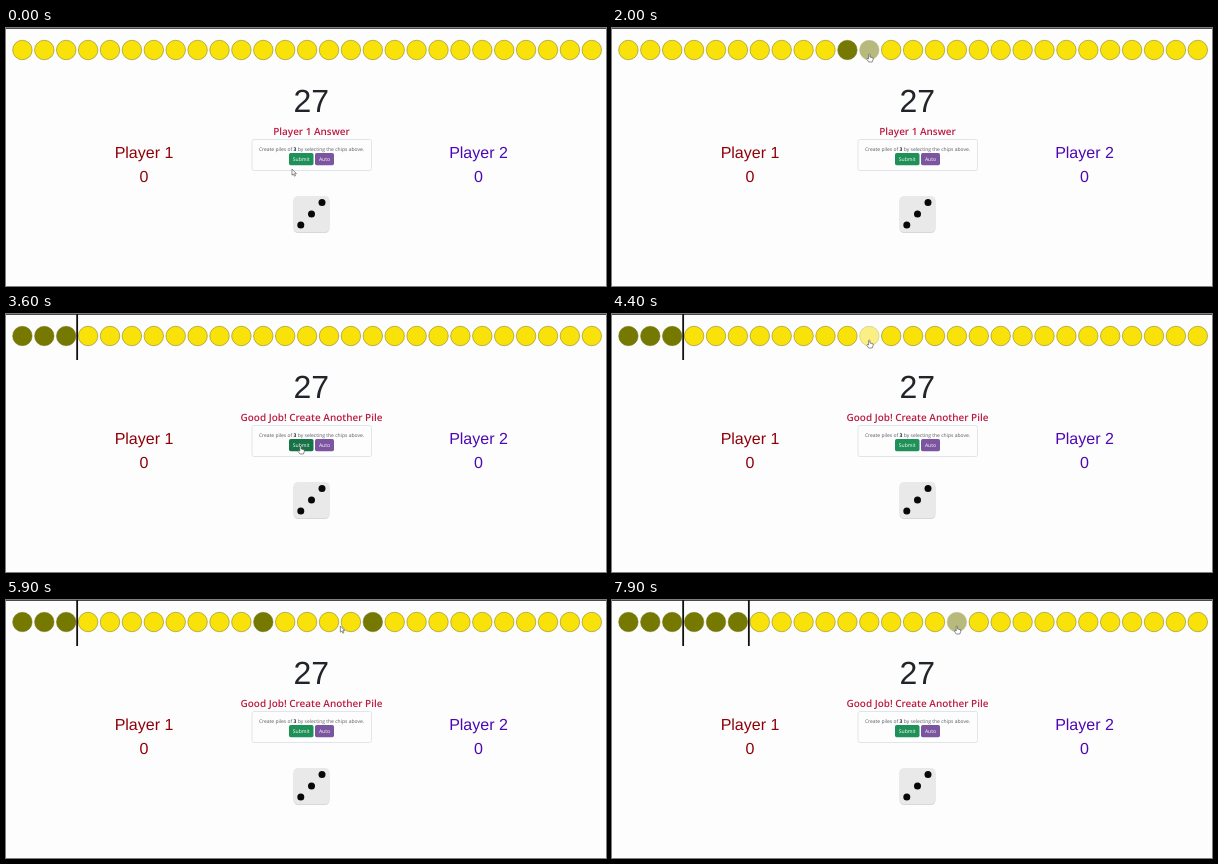
These frames come from a looping animation (600 px wide and 258 px high, 8 s). An HTML page:

```html
<!DOCTYPE html>
<html lang="en">
<head>
<meta charset="utf-8">
<title>Chip piles</title>
<style>
  html, body { margin: 0; height: 100%; overflow: hidden; background: #fdfdfd; }
  svg { display: block; width: 600px; height: 258px; }
  text { text-anchor: middle; text-rendering: geometricPrecision; font-family: "Open Sans", "Noto Sans", sans-serif; }
  .big { font-family: "Liberation Sans", Arial, sans-serif; font-size: 16px; }
  .total { font-size: 32px; fill: #212529; }
  .message { font-size: 9.95px; font-weight: 600; fill: #bb1a40; }
  .small { font-size: 5px; fill: #555a5f; }
  .button { font-size: 5.1px; font-weight: 500; fill: #fff; }
  .chip { stroke: #75701c; stroke-width: .5; }
  .cursor { fill: #fff; stroke: #444; stroke-width: .6; stroke-linejoin: round; }
</style>
</head>
<body>
<svg viewBox="0 0 600 258">
  <rect width="600" height="258" fill="#fdfdfd"/>
  <rect width="600" height="1" fill="#48494c"/>
  <g id="chips"></g>
  <path id="dividers" stroke="#111" stroke-width="1.8"/>

  <text class="big total" x="305.3" y="83.6">27</text>
  <text id="message" class="message" x="305.5" y="107"></text>
  <g fill="#900008">
    <text class="big" x="138" y="129.5">Player 1</text>
    <text class="big" x="138" y="153.5">0</text>
  </g>
  <g fill="#4d08b4">
    <text class="big" x="472.5" y="129.5">Player 2</text>
    <text class="big" x="472.5" y="153.5">0</text>
  </g>

  <rect x="246" y="111.5" width="119.5" height="31" rx="2" fill="#fdfdfd" stroke="#d9e0e7" stroke-width=".8"/>
  <text class="small" x="305.5" y="123">Create piles of <tspan font-weight="700" fill="#222">3</tspan> by selecting the chips above.</text>
  <rect id="submit" x="283" y="125" width="24.5" height="12.3" rx="1.7"/>
  <text class="button" x="295.2" y="133">Submit</text>
  <rect x="309" y="125" width="19" height="12.3" rx="1.7" fill="#7b559f"/>
  <text class="button" x="318.5" y="133">Auto</text>

  <rect x="287.5" y="169" width="36" height="36" rx="4.5" fill="#c9c9c9" opacity=".7"/>
  <rect x="287.5" y="168" width="36" height="36" rx="4.5" fill="#e9e9e9"/>
  <g fill="#080808">
    <circle cx="316" cy="174.5" r="3.5"/>
    <circle cx="305.5" cy="186" r="3.5"/>
    <circle cx="294.8" cy="197" r="3.5"/>
  </g>

  <path id="arrow" class="cursor" d="M0 0V6.2L1.5 5 2.5 7.2 3.5 6.7 2.5 4.6H4.4Z"/>
  <path id="hand" class="cursor" d="M-.7 .5Q0-.5 .7 .5V3L3.8 3.8V5.6L2.9 8H-.6L-2.6 5.2Q-2.3 4-.7 5Z"/>
</svg>
<script>
const LOOP = 8000, STEP = 100, COUNT = 27, PILE = 3;
const HOLD = 100, SETTLE = 200, MAX_TRAVEL = 800;
const byId = id => document.getElementById(id);
const chipX = i => 16.4 + 21.9 * i, chipY = 22;

const rest = (at, x, y) => ({ at, x, y });
const pick = (at, chip) => ({ at, chip, x: chipX(chip), y: chipY + 4 });
const submit = at => ({ at, submits: true, x: 294.5, y: 132 });

const actions = [
  rest(0, 286, 141), rest(500, 317, 139),
  pick(1600, 10), pick(2000, 11), pick(2500, 12), submit(3500),
  pick(4700, 11), pick(5600, 16), pick(6200, 14), submit(7100),
  pick(7900, 15)
];

const chips = Array.from({ length: COUNT }, (_, i) => {
  const chip = document.createElementNS("http://www.w3.org/2000/svg", "circle");
  const attributes = { class: "chip", cx: chipX(i), cy: chipY, r: 9.75 };
  for (const name in attributes) chip.setAttribute(name, attributes[name]);
  return byId("chips").appendChild(chip);
});

// The pointer leaves shortly after one action and settles before the next.
function pointerAt(t) {
  const n = actions.findLastIndex(action => action.at <= t);
  const from = actions[n], to = actions[n + 1] || from;
  const leave = from.at + HOLD;
  const travel = Math.min(to.at - SETTLE - leave, MAX_TRAVEL);
  const u = Math.min(1, Math.max(0, (t - leave) / travel));
  const ease = u * u * (3 - 2 * u);
  return [from.x + (to.x - from.x) * ease, from.y + (to.y - from.y) * ease];
}

function draw(t) {
  const [x, y] = pointerAt(t);
  const past = actions.filter(action => action.at <= t);
  const piles = past.filter(action => action.submits).length;
  const current = past.slice(past.findLastIndex(action => action.submits) + 1);
  let overChip = false;

  chips.forEach((chip, i) => {
    const dark = i < piles * PILE || current.some(action => action.chip === i);
    const hover = i >= piles * PILE && Math.hypot(x - chipX(i), y - chipY) < 10;
    overChip ||= hover;
    chip.setAttribute("fill", dark ? "#757900" : "#f9e20a");
    chip.setAttribute("opacity", hover ? .5 : 1);
  });

  let lines = "";
  for (let p = 1; p <= piles; p++) lines += `M${chipX(p * PILE - .5)} 0V46`;
  byId("dividers").setAttribute("d", lines);
  byId("message").textContent = piles ? "Good Job! Create Another Pile" : "Player 1 Answer";

  const overSubmit = x > 283 && x < 307.5 && y > 125 && y < 137.3;
  byId("submit").setAttribute("fill", overSubmit ? "#157347" : "#1f9058");

  const pointing = overChip || overSubmit;
  for (const [id, shown] of [["hand", pointing], ["arrow", !pointing]]) {
    byId(id).setAttribute("transform", `translate(${x} ${y})`);
    byId(id).setAttribute("visibility", shown ? "visible" : "hidden");
  }
}

const start = performance.now();
function tick() {
  const t = (performance.now() - start) % LOOP;
  draw(Math.floor(t / STEP) * STEP);
  requestAnimationFrame(tick);
}
tick();
</script>
</body>
</html>
```
